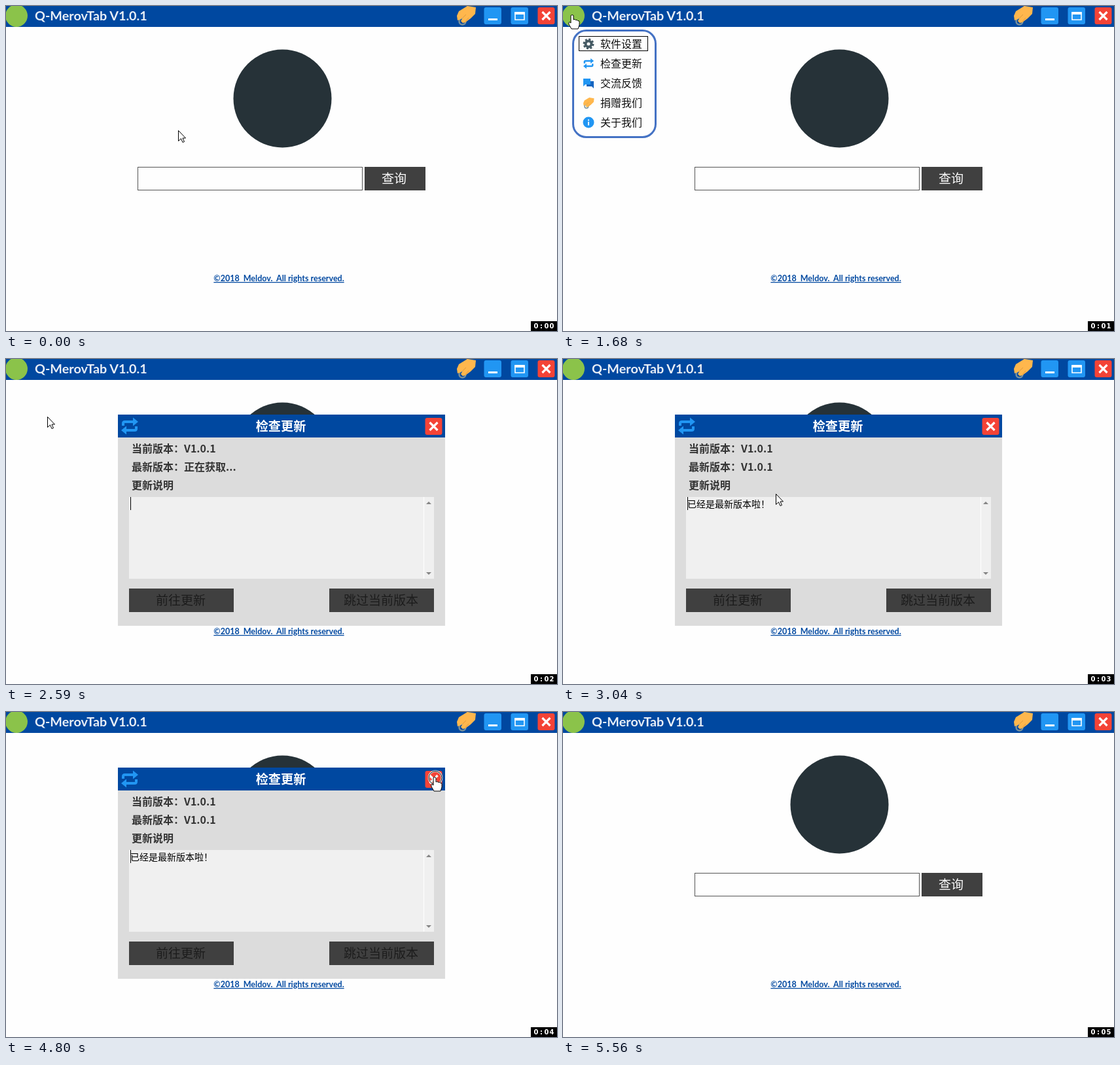
Recreate the animation shown at these times as an HTML page. Size 842 by 497 pixels, loop 5.83 s.

```html
<!DOCTYPE html>
<html lang="zh-CN">
<head>
<meta charset="utf-8">
<title>Command lookup</title>
<style>
  html, body { margin: 0; width: 100%; height: 100%; overflow: hidden; background: #fefefe; }
  svg { display: block; width: 842px; height: 497px; }
  text { font-family: "Noto Sans CJK SC", "Noto Sans CJK", sans-serif; white-space: pre; }
  .latin { font-family: Lato, "Open Sans", sans-serif; font-weight: 700; }
  .label { font-size: 16px; font-weight: 700; fill: #333; }
  .item { font-size: 16px; fill: #111; }
  .button { font-size: 19px; text-anchor: middle; }
  .clock { font: 700 10px "DejaVu Sans", sans-serif; fill: #fff; text-anchor: middle; }
</style>
</head>
<body>
<svg viewBox="0 0 842 497">
  <defs>
    <g id="repeat" fill="#2196f3">
      <g id="half">
        <path d="M3 12.500V9Q3 6.500 5.500 6.500H19" fill="none" stroke="#2196f3" stroke-width="4"/>
        <path d="M18 0L26 6.500 18 13Z"/>
      </g>
      <use href="#half" transform="rotate(180 13 13)"/>
    </g>
    <g id="give">
      <circle cx="8.500" cy="23.500" r="5" fill="none" stroke="#78909c" stroke-width="2.500"/>
      <path d="M16 0L29 2 28 12 21 19 13 25 9 26 6 23 9 18 4 21 1 22 0 15 3 8Z" fill="#ffb74d"/>
      <path d="M9 18L14 13M13 24L18 18" fill="none" stroke="#e09a3c"/>
    </g>
    <g id="close">
      <rect width="26" height="26" rx="3" fill="#f44336"/>
      <path d="M7 7L19 19M19 7L7 19" stroke="#fff" stroke-width="3.200"/>
    </g>
  </defs>

  <rect width="842" height="497" fill="#fefefe"/>
  <rect width="842" height="32" fill="#0048a0"/>
  <circle cx="16" cy="15" r="17" fill="#8bc34a"/>
  <text class="latin" x="44" y="22" font-size="19.800" fill="#e8eef6">Q-MerovTab V1.0.1</text>
  <use href="#give" x="689" y="0"/>
  <g fill="#2196f3">
    <rect x="730.500" y="2" width="26.500" height="26" rx="3"/>
    <rect x="771.500" y="2" width="26.500" height="26" rx="3"/>
  </g>
  <path d="M737 19H751V22H737Z" fill="#fff"/>
  <path d="M778 10.500H792V21H778Z" fill="none" stroke="#fff" stroke-width="1.600"/>
  <path d="M777.200 9H792.800V13H777.200Z" fill="#fff"/>
  <use href="#close" x="812.500" y="2"/>

  <circle cx="422.500" cy="141.500" r="75" fill="#263238"/>
  <rect x="201.500" y="246.500" width="343" height="35" fill="#fefefe" stroke="#555"/>
  <rect x="548" y="246" width="93" height="36" fill="#404040"/>
  <text class="button" x="593" y="271" fill="#fff">查询</text>
  <text class="latin" x="417" y="421" font-size="12.500" fill="#0048a0" text-anchor="middle" text-decoration="underline">©2018  Meldov.  All rights reserved.</text>

  <g id="menu">
    <rect x="15.500" y="37.500" width="126" height="163" rx="20" fill="#fefefe" stroke="#4472c4" stroke-width="3"/>
    <rect id="focus" x="24.500" y="46.500" width="105" height="22" fill="none" stroke="#000"/>
    <rect id="hover" x="24" y="76" width="106" height="23" fill="#e5e5e5"/>
    <g fill="none" stroke="#455a64">
      <circle cx="39" cy="58" r="4.500" stroke-width="4"/>
      <circle cx="39" cy="58" r="7" stroke-width="3" stroke-dasharray="3 2.498"/>
    </g>
    <use href="#repeat" transform="translate(31 80) scale(.62)"/>
    <path d="M36 115H47V126L44 123H36Z" fill="#1565c0"/>
    <path d="M31 111H42V120H34L31 123Z" fill="#2196f3"/>
    <use href="#give" transform="translate(31 140) scale(.57)"/>
    <circle cx="39" cy="178" r="8.500" fill="#2196f3"/>
    <path d="M38 173.500H40V175.500H38ZM38 177H40V182.500H38Z" fill="#fff"/>
    <g id="items"></g>
  </g>

  <g id="dialog">
    <rect x="171" y="85" width="500" height="323" fill="#dcdcdc"/>
    <rect x="171" y="85" width="500" height="35" fill="#0048a0"/>
    <use href="#repeat" x="176" y="89.500"/>
    <text x="420" y="110" font-size="19.200" font-weight="700" fill="#fff" text-anchor="middle">检查更新</text>
    <use href="#close" x="640.500" y="90"/>
    <text class="label" x="192" y="143">当前版本：</text>
    <text class="label" x="272" y="143">V1.0.1</text>
    <text class="label" x="192" y="171">最新版本：</text>
    <text class="label" id="latest" x="272" y="171"></text>
    <text class="label" x="192" y="199">更新说明</text>
    <rect x="188" y="211" width="466" height="125" fill="#f0f0f0"/>
    <path d="M638.500 211V336" stroke="#fff"/>
    <path d="M642 222L646 218 650 222ZM642 326L646 330 650 326Z" fill="#858585"/>
    <text id="note" x="190" y="227" font-size="14" fill="#000">已经是最新版本啦！</text>
    <rect id="caret" x="190" y="211" width="1" height="20" fill="#000"/>
    <path d="M188 351H348V387H188ZM494 351H654V387H494Z" fill="#404040"/>
    <text class="button" x="267" y="376" fill="#1c1c1c">前往更新</text>
    <text class="button" x="573" y="376" fill="#1c1c1c">跳过当前版本</text>
  </g>

  <rect x="802" y="482" width="40" height="15" fill="#000"/>
  <text class="clock" id="clock" x="810 818 826 834" y="493">0:00</text>

  <g id="pointer">
    <g id="ring" fill="none">
      <circle cx="1" cy="1.500" r="10" stroke="#fff" stroke-width="2.500"/>
      <circle cx="1" cy="1.500" r="10" stroke="#000"/>
    </g>
    <g fill="#fff" stroke="#000" stroke-linejoin="round">
      <path id="arrow" d="M.5 .5V16.500L4.500 12.800 7 18.500 9.500 17.500 7 12H11.500Z"/>
      <path id="hand" d="M-2 1.500Q0 -.5 2 1.500V8Q4 6.500 5.500 8.500 7.500 7.500 8.500 9.500 11 9 11 11.500V16L9 22H-1L-5 15Q-6 12 -4 11.500L-2 13Z"/>
    </g>
  </g>
</svg>
<script>
const LOOP = 5830;
const $ = id => document.getElementById(id);
const show = (id, on) => { $(id).style.display = on ? "" : "none"; };

// time, x, y, shape ("" hides the pointer), pressed
const path = [
  [0, 263, 190, "arrow"],
  [590, 236, 174, "arrow"],
  [740, 162, 119, "arrow"],
  [890, 100, 77, "arrow"],
  [1000, 62, 53, "arrow"],
  [1110, 46, 43, "arrow"],
  [1260, 22, 24, "arrow"],
  [1380, 14, 13, "hand"],
  [1540, 14, 13, "hand", true],
  [1680, 14, 13, "hand"],
  [1800, 24, 32, "arrow"],
  [1920, 45, 62, "arrow"],
  [2020, 59, 81, "arrow"],
  [2140, 63, 87, "arrow"],
  [2290, 63, 88, "arrow"],
  [2440, 63, 88, "arrow", true],
  [2590, 63, 88, "arrow"],
  [2740, 99, 110, "arrow"],
  [2890, 254, 175, "arrow"],
  [3040, 325, 206, "arrow"],
  [3150, 353, 218, "arrow"],
  [3260, 359, 220, "arrow"],
  [4190, 450, 198, "arrow"],
  [4300, 603, 120, "arrow"],
  [4410, 648, 97, "hand"],
  [4560, 655, 98, "hand"],
  [4800, 655, 99, "hand", true],
  [4950, 655, 99, "arrow"],
  [5070, 659, 217, "arrow"],
  [5220, 676, 295, "arrow"],
  [5330, 706, 370, "arrow"],
  [5440, 740, 432, "arrow"],
  [5560, 0, 0, ""]
];
const seconds = [1000, 2020, 3040, 4190, 5220];
const blinks = [3150, 3760, 4190, 4800];
const passed = (list, t) => list.filter(v => v <= t).length;

["软件设置", "检查更新", "交流反馈", "捐赠我们", "关于我们"].forEach((name, i) => {
  const item = document.createElementNS("http://www.w3.org/2000/svg", "text");
  item.setAttribute("class", "item");
  item.setAttribute("x", 57);
  item.setAttribute("y", 64 + 30 * i);
  item.textContent = name;
  $("items").append(item);
});

function draw(t) {
  const [, x, y, shape, pressed] = path.findLast(step => step[0] <= t);
  $("pointer").setAttribute("transform", `translate(${x} ${y})`);
  show("arrow", shape === "arrow");
  show("hand", shape === "hand");
  show("ring", pressed);

  show("menu", t >= 1680 && t < 2590);
  show("focus", t < 2440);
  show("hover", t >= 2440);

  const ready = t >= 2890;
  show("dialog", t >= 2590 && t < 4950);
  show("note", ready);
  show("caret", passed(blinks, t) % 2 === 0);
  $("latest").textContent = ready ? "V1.0.1" : "正在获取...";
  $("clock").textContent = "0:0" + passed(seconds, t);
}

const start = performance.now();
function tick() {
  draw((performance.now() - start) % LOOP);
  requestAnimationFrame(tick);
}
tick();
</script>
</body>
</html>
```
